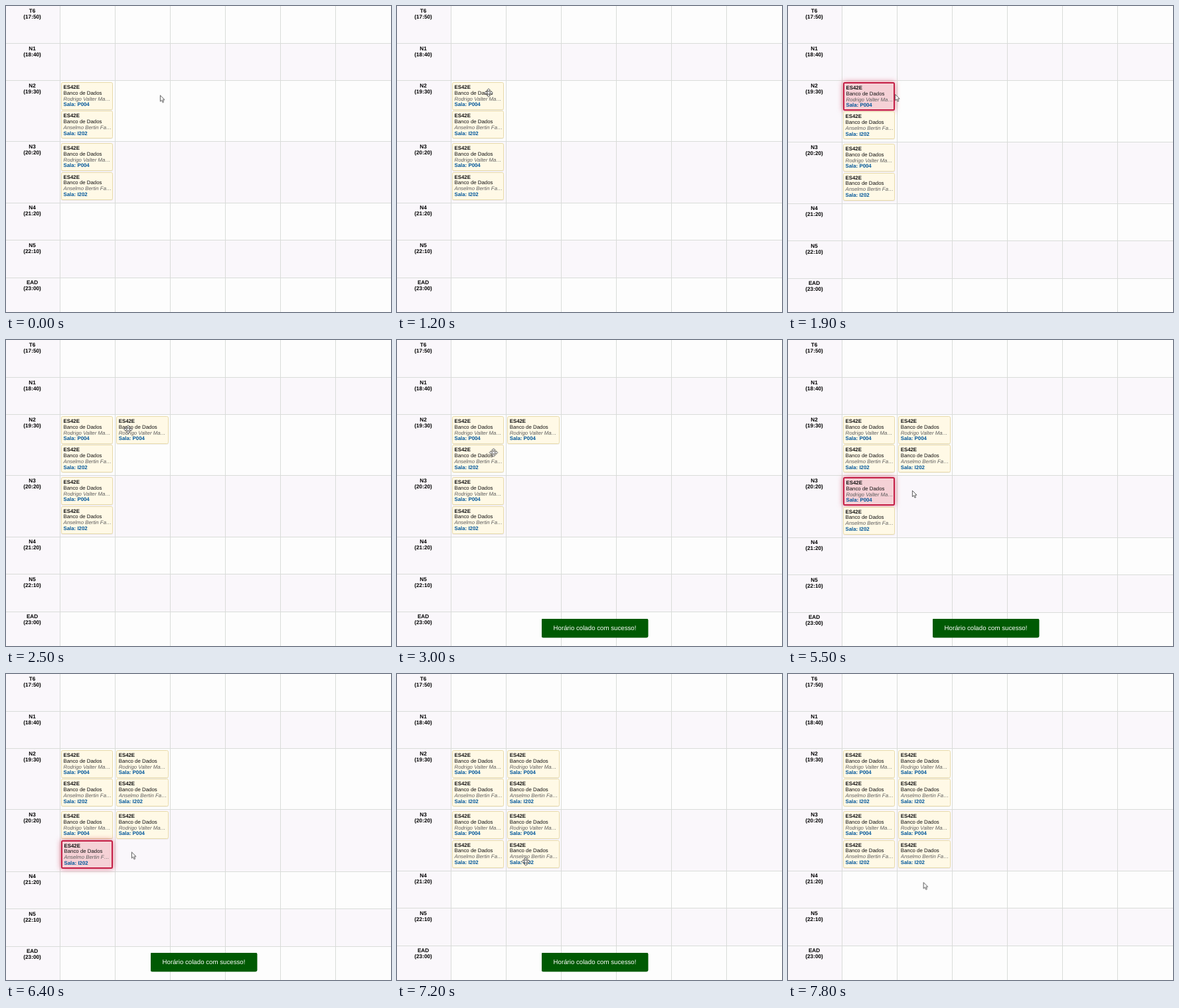
Animation, 580 px wide and 462 px high, one loop 8 s. Source, as an HTML page:

```html
<!DOCTYPE html>
<html lang="pt-BR">
<head>
<meta charset="utf-8">
<title>Grade de horários</title>
<style>
* { box-sizing: border-box; }
html, body { margin: 0; width: 100%; height: 100%; overflow: hidden; background: #fdfdfd; }
body {
  position: relative;
  font-family: "Liberation Sans", Arial, sans-serif;
  text-rendering: geometricPrecision;
}
#grid { position: absolute; left: 0; top: -.7px; width: 581px; }
.row {
  display: grid;
  grid-template-columns: 80.5px repeat(6, 83.2px);
  height: 56.5px;
  border-top: 1px solid #d9dcd9;
  background: #fdfdfd;
}
.row:nth-child(even) { background: #faf7fb; }
.row.busy { height: auto; }
.label {
  padding: 2.8px 1.4px 0 0;
  background: #faf7fb;
  color: #000;
  font: bold 8.2px/9px "Liberation Sans", Arial, sans-serif;
  text-align: center;
}
.cell { border-left: 1px solid #d9dcd9; padding: 1.9px 0 4.1px 1.8px; }

.card {
  position: relative;
  z-index: 1;
  width: 78.2px;
  height: 41.9px;
  padding: 3px 1.2px 0 2.2px;
  border: 1px solid #e8daa9;
  border-radius: 2.5px;
  background: #fff9e6;
  box-shadow: 0 1px 1px rgba(0, 0, 0, .06);
  color: #111;
  font-size: 7.85px;
  line-height: 8.7px;
  white-space: nowrap;
  animation: 8s step-end infinite;
}
.card + .card { margin-top: 1.4px; }
.card > * { display: block; overflow: hidden; text-overflow: ellipsis; }
.card i { color: #5c5c5c; }
.card .room { color: #01579b; }

#cursor { position: absolute; left: 0; top: 0; z-index: 3; animation: travel 8s ease-in-out infinite; }
.arrow, .move { position: absolute; overflow: visible; animation: 8s step-end infinite; }
.arrow { left: 0; top: 0; width: 8px; height: 12px; animation-name: arrow; }
.move { left: -7px; top: -7px; width: 14px; height: 14px; animation-name: move; }
.arrow path, .move path { fill: #fff; stroke: #4a4a4a; stroke-width: .9; stroke-linejoin: round; }

@keyframes travel {
  0%, 1.2% { transform: translate(232px, 134.5px); }
  12.5% { transform: translate(139px, 131px); }
  15%, 20% { transform: translate(138px, 131px); }
  27.5%, 31.3% { transform: translate(184px, 135px); }
  37.2%, 47.4% { transform: translate(145.5px, 170px); }
  50%, 52.5% { transform: translate(186px, 178px); }
  56%, 58.7% { transform: translate(148.3px, 212.7px); }
  65%, 70% { transform: translate(187px, 227px); }
  75%, 79.3% { transform: translate(146px, 265px); }
  79.4%, 80.6% { transform: translate(189px, 268.5px); }
  83.7%, 87% { transform: translate(190px, 270px); }
  95%, 100% { transform: translate(203.7px, 314.3px); }
}
@keyframes arrow {
  0%, 23.7%, 48.7%, 61.4%, 79.4%, 91.9%, 100% { opacity: 1; }
  8.7%, 29.9%, 52.4%, 69.9%, 86.2% { opacity: 0; }
}
@keyframes move {
  0%, 23.7%, 48.7%, 61.4%, 79.4%, 91.9%, 100% { opacity: 0; }
  8.7%, 29.9%, 52.4%, 69.9%, 86.2% { opacity: 1; }
}

#toast {
  position: absolute;
  left: 217px;
  top: 420px;
  z-index: 2;
  width: 161px;
  height: 29px;
  transform: translate(.5px, .5px);
  border-radius: 3px;
  background: #005a03;
  color: #fff;
  font-size: 9.7px;
  line-height: 29px;
  text-align: center;
  white-space: nowrap;
  animation: toast 8s linear infinite;
}
@keyframes toast {
  0%, 32.5% { opacity: 0; }
  35.5%, 90.5% { opacity: 1; }
  94.5%, 100% { opacity: 0; }
}
</style>
<style id="steps"></style>
</head>
<body>
<div id="grid"></div>
<div id="toast">Horário colado com sucesso!</div>
<div id="cursor">
  <svg class="arrow" viewBox="0 0 8 12"><path d="M.4 .4V9.6L2.5 7.7L4 11.2L5.6 10.5L4.1 7.1H7Z"/></svg>
  <svg class="move" viewBox="-7 -7 14 14"><path d="M0-6.3L2.6-3.6H1V-1H3.6V-2.6L6.3 0L3.6 2.6V1H1V3.6H2.6L0 6.3L-2.6 3.6H-1V1H-3.6V2.6L-6.3 0L-3.6-2.6V-1H-1V-3.6H-2.6Z"/></svg>
</div>
<script>
const rows = [
  ['T6', '17:50'], ['N1', '18:40'], ['N2', '19:30', 1], ['N3', '20:20', 3],
  ['N4', '21:20'], ['N5', '22:10'], ['EAD', '23:00']
];
const lessons = [['Rodrigo Valter Mattos', 'P004'], ['Anselmo Bertin Farias', 'I202']];

// [selected, pasted] for each card, in percent of the loop
const spans = [[17.4, 29.9], [47.4, 52.4], [59.9, 69.9], [79.4, 86.2]];

// a selected card is taller and pushes the rows below it
const plain = 'height:41.9px;border:1px solid #e8daa9;background:#fff9e6;box-shadow:0 1px 1px rgba(0,0,0,.06)';
const picked = 'height:42.9px;border:2px solid #c41e45;background:#f5d1d6;box-shadow:0 0 9px rgba(205,30,60,.6)';

document.getElementById('steps').textContent = spans.map(([on, off], i) => `
  @keyframes pick${i + 1} { 0%, ${off}%, 100% { ${plain} } ${on}% { ${picked} } }
  @keyframes paste${i + 1} { 0% { opacity: 0 } ${off}%, 100% { opacity: 1 } }
`).join('');

const card = ([teacher, room], anim) => `<div class="card" style="animation-name:${anim}">
  <b>ES42E</b><span>Banco de Dados</span><i>${teacher}</i><b class="room">Sala: ${room}</b></div>`;

const stack = (kind, first) => lessons.map((l, i) => card(l, kind + (first + i))).join('');

const cells = first => ['pick', 'paste', '', '', '', '']
  .map(kind => `<div class="cell">${first && kind ? stack(kind, first) : ''}</div>`).join('');

document.getElementById('grid').innerHTML = rows.map(([name, time, first]) =>
  `<div class="row ${first ? 'busy' : ''}"><div class="label">${name}<br>(${time})</div>${cells(first)}</div>`
).join('');
</script>
</body>
</html>
```
